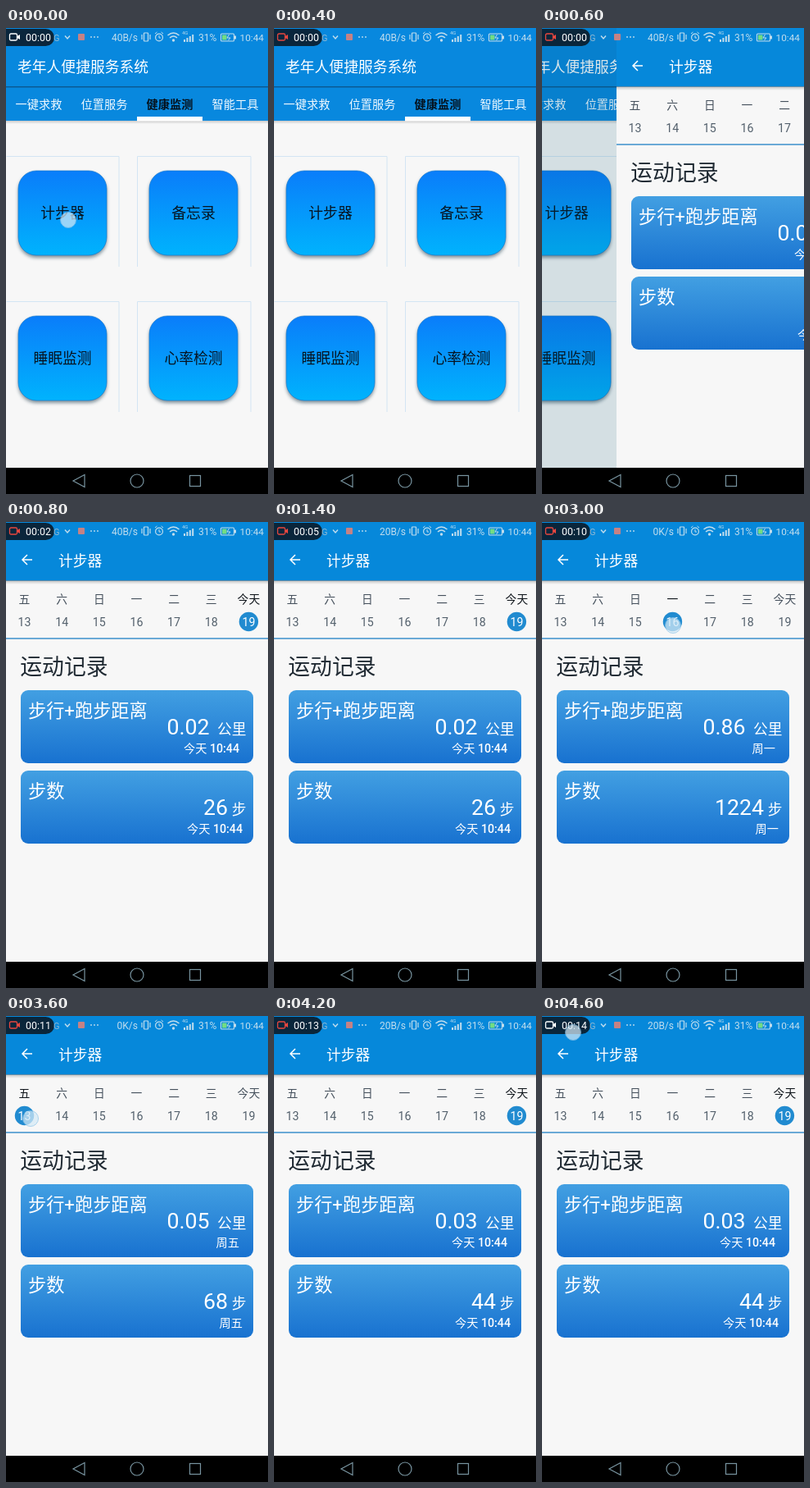
These frames come from a looping animation (320 px wide and 568 px high, 4800 ms). An HTML page:

```html
<!DOCTYPE html>
<html lang="zh-CN">
<head>
<meta charset="utf-8">
<title>计步器</title>
<style>
html, body { margin: 0; width: 100%; height: 100%; overflow: hidden; background: #f7f7f7; }
svg { display: block; width: 100vw; height: 100vh; }
text { font-family: Roboto, "Noto Sans CJK SC", "Noto Sans CJK", sans-serif; white-space: pre; }
</style>
</head>
<body>
<svg id="stage" viewBox="0 0 320 568"></svg>
<script>
const STEP = 200, STEPS = 24;
const stage = document.getElementById('stage');

// Text is placed by the vertical centre of its glyphs.
const text = (s, x, cy, size, fill = '#fff', anchor = 'start', weight = 400) =>
  `<text x="${x}" y="${(cy + size * .37).toFixed(2)}" font-size="${size}" fill="${fill}" text-anchor="${anchor}" font-weight="${weight}">${s}</text>`;
const rect = (x, y, w, h, fill, rx = 0, extra = '') =>
  `<rect x="${x}" y="${y}" width="${w}" height="${h}" rx="${rx}" fill="${fill}" ${extra}/>`;
const circle = (x, y, r, fill, extra = '') =>
  `<circle cx="${x}" cy="${y}" r="${r}" fill="${fill}" ${extra}/>`;
const line = (d, color, width = 1) =>
  `<path d="${d}" fill="none" stroke="${color}" stroke-width="${width}"/>`;
const gradient = (id, top, bottom) =>
  `<linearGradient id="${id}" x2="0" y2="1"><stop stop-color="${top}"/><stop offset="1" stop-color="${bottom}"/></linearGradient>`;

const defs = `<defs>
  ${gradient('button', '#0a7dfa', '#00b3fd')}
  ${gradient('card', '#429fe2', '#1872d0')}
  ${gradient('shade', '#00000030', '#00000000')}
  <filter id="soft" x="-20%" y="-20%" width="140%" height="150%"><feGaussianBlur stdDeviation="2"/></filter>
</defs>`;

const days = [['五', '周五'], ['六', '周六'], ['日', '周日'], ['一', '周一'],
              ['二', '周二'], ['三', '昨天'], ['今天', '今天 10:44']];
// "from" is the step at which a record is chosen.
const records = [
  { from: 0, day: 6, km: '0.02', count: 26 },
  { from: 11, day: 5, km: '0.76', count: 1081 },
  { from: 13, day: 4, km: '0.71', count: 1013 },
  { from: 14, day: 3, km: '0.86', count: 1224 },
  { from: 16, day: 2, km: '0.32', count: 462 },
  { from: 17, day: 1, km: '0.11', count: 157 },
  { from: 18, day: 0, km: '0.05', count: 68 },
  { from: 21, day: 6, km: '0.03', count: 44 }
];
const touches = { 0: [76, 234], 10: [252, 123], 12: [206, 123], 15: [160, 126],
                  18: [30, 125], 20: [297, 123], 23: [38, 20] };
const seconds = [0, 0, 0, 0, 2, 3, 4, 5, 5, 6, 7, 8, 8, 9, 9, 10, 10, 11, 11, 12, 12, 13, 13, 14];
const panelX = step => step < 3 ? 320 : step === 3 ? 91 : 0;
const dayX = i => 22.5 + i * 45.65;

function homeButton(label, x, y) {
  const left = x < 100 ? 0 : 160, right = left ? 299 : 138, top = y - 18;
  return line(`M${left + .5} ${left ? top + 135 : top + .5}V${top + .5}H${right}V${top + 135}`, '#d3e5f3')
    + rect(x, y + 3, 108, 103, '#405868', 22, 'opacity=".65" filter="url(#soft)"')
    + rect(x, y, 108, 103, 'url(#button)', 22, 'stroke="#1679cc" stroke-width=".7"')
    + text(label, x + 54, y + 51.5, 17.8, '#07131f', 'middle', 500);
}

function home() {
  const tabs = ['一键求救', '位置服务', '健康监测', '智能工具'];
  return rect(0, 0, 320, 568, '#f7f7f7')
    + rect(0, 0, 320, 113, '#0888de')
    + rect(0, 71, 320, 1.5, '#0a5b94')
    + rect(0, 113, 320, 4, 'url(#shade)')
    + text('老年人便捷服务系统', 14, 47, 17.8)
    + tabs.map((s, i) => text(s, 40 + i * 80, 93, 14.2, i === 2 ? '#05111c' : '#f2faff', 'middle', i === 2 ? 700 : 400)).join('')
    + rect(160, 108, 80, 5.5, '#fff')
    + homeButton('计步器', 15, 174) + homeButton('备忘录', 175, 174)
    + homeButton('睡眠监测', 15, 351) + homeButton('心率检测', 175, 351);
}

function card(y, title, value, unit, when, valueX, whenX) {
  return rect(18, y, 284, 89, 'url(#card)', 9)
    + text(title, 27, y + 25, 22.2)
    + text(value, valueX, y + 44.5, 26.7, '#fff', 'end')
    + text(unit, 293.5, y + 47, 17.8, '#fff', 'end')
    + text(when, whenX, y + 71, 14.2, '#fff', 'end', 500);
}

function pedometer({ day, km, count }) {
  const week = days.map(([name], i) => {
    const on = i === day;
    return text(name, dayX(i), 94, 13.8, on ? '#10161c' : '#46515d', 'middle', on ? 500 : 400)
      + (on ? circle(dayX(i), 121.5, 11.7, '#218bd0') : '')
      + text(13 + i, dayX(i), 121.5, 14.2, on ? '#fff' : '#53606c', 'middle');
  }).join('');
  const when = days[day][1];
  return rect(0, 0, 320, 568, '#f7f7f7')
    + rect(0, 0, 320, 71, '#0688da')
    + rect(0, 71, 320, 1, '#5f8ba8')
    + rect(0, 72, 320, 4, 'url(#shade)')
    + line('M32 46H20M26 40L20 46L26 52', '#fff', 1.5)
    + text('计步器', 64, 47, 17.8)
    + week
    + rect(0, 141, 320, 2, '#6aaad6')
    + text('运动记录', 17.3, 176, 26.8, '#202a33', 'start', 500)
    + card(205, '步行+跑步距离', km, '公里', when, 248.5, 285)
    + card(303, '步数', count, '步', when, 271, 289);
}

function statusBar(step) {
  const ink = '#c1dded';
  const rate = step < 6 ? '40B/s' : step < 10 || step > 20 ? '20B/s' : '0K/s';
  const lens = step % 23 ? '#e8473f' : '#fff';
  const bars = [0, 1, 2, 3].map(i => rect(217 + i * 3.4, 14 - i * 2, 2, 3 + i * 2, ink)).join('');
  return rect(-12, 1, 71, 21, '#0b1a26', 10.5, 'opacity=".88"')
    + rect(4.5, 7, 9, 8, 'none', 1.5, `stroke="${lens}" stroke-width="1.3"`)
    + `<path d="M13.5 10L17 8V14L13.5 12Z" fill="${lens}"/>`
    + text('00:' + String(seconds[step]).padStart(2, '0'), 24, 11.5, 12.4)
    + text('G', 58, 11.5, 11, '#91bad5')
    + line('M72 9.5L75 13L78 9.5', ink, 1.4)
    + rect(88, 7, 8, 8, '#c58285', 1)
    + [104, 108, 112].map(x => circle(x, 11, .9, ink)).join('')
    + text(rate, 161, 11.5, 12, ink, 'end')
    + rect(168.5, 6, 5, 10, 'none', .5, `stroke="${ink}" stroke-width="1.2"`)
    + line('M166 8V14M176 8V14', ink, 1.2)
    + circle(187, 11.5, 4.4, 'none', `stroke="${ink}" stroke-width="1.2"`)
    + line('M187 9V12H189M182 7L184.5 5M192 7L189.5 5', ink)
    + line('M197.5 9Q204.5 3 211.5 9M200 12Q204.5 8 209 12', ink, 1.5)
    + circle(204.5, 15, 1.7, ink)
    + text('4G', 215, 5.5, 6, ink) + bars
    + text('31%', 235, 11.5, 12, ink)
    + rect(262.5, 7, 16, 9, 'none', 1, `stroke="${ink}" stroke-width="1.1"`)
    + rect(279, 9.5, 2, 4, ink) + rect(264, 8.5, 5.5, 6, '#72dc83')
    + line('M272.5 8L270 12H274L271.5 15', ink)
    + text('10:44', 315, 11.5, 11.8, ink, 'end');
}

const navBar = rect(0, 536, 320, 32, '#000')
  + line('M96 544.5V559.5L82 552Z', '#7894a0', 1.2)
  + circle(160, 552, 8, 'none', 'stroke="#7894a0" stroke-width="1.2"')
  + rect(224.5, 545.5, 13, 13, 'none', 0, 'stroke="#7894a0" stroke-width="1.2"');

const touchDot = ([x, y]) =>
  circle(x, y, 9.5, '#d5eaf6', 'opacity=".72" stroke="#8cc4e8" stroke-width="1"');

function draw(step) {
  const x = panelX(step);
  const record = records.filter(r => r.from <= step).pop();
  let scene = '';
  if (x > 0) scene += `<g transform="translate(${-(320 - x) * .17})">${home()}</g>`;
  if (x < 320) {
    if (x > 0) scene += rect(0, 0, x, 536, '#00506c', 0, 'opacity=".14"');
    scene += `<g transform="translate(${x})">${pedometer(record)}</g>`;
  }
  stage.innerHTML = defs + scene + statusBar(step) + navBar
    + (touches[step] ? touchDot(touches[step]) : '');
}

const start = performance.now();
let shown = -1;
function tick() {
  const step = Math.floor((performance.now() - start) / STEP) % STEPS;
  if (step !== shown) draw(shown = step);
  requestAnimationFrame(tick);
}
tick();
</script>
</body>
</html>
```
